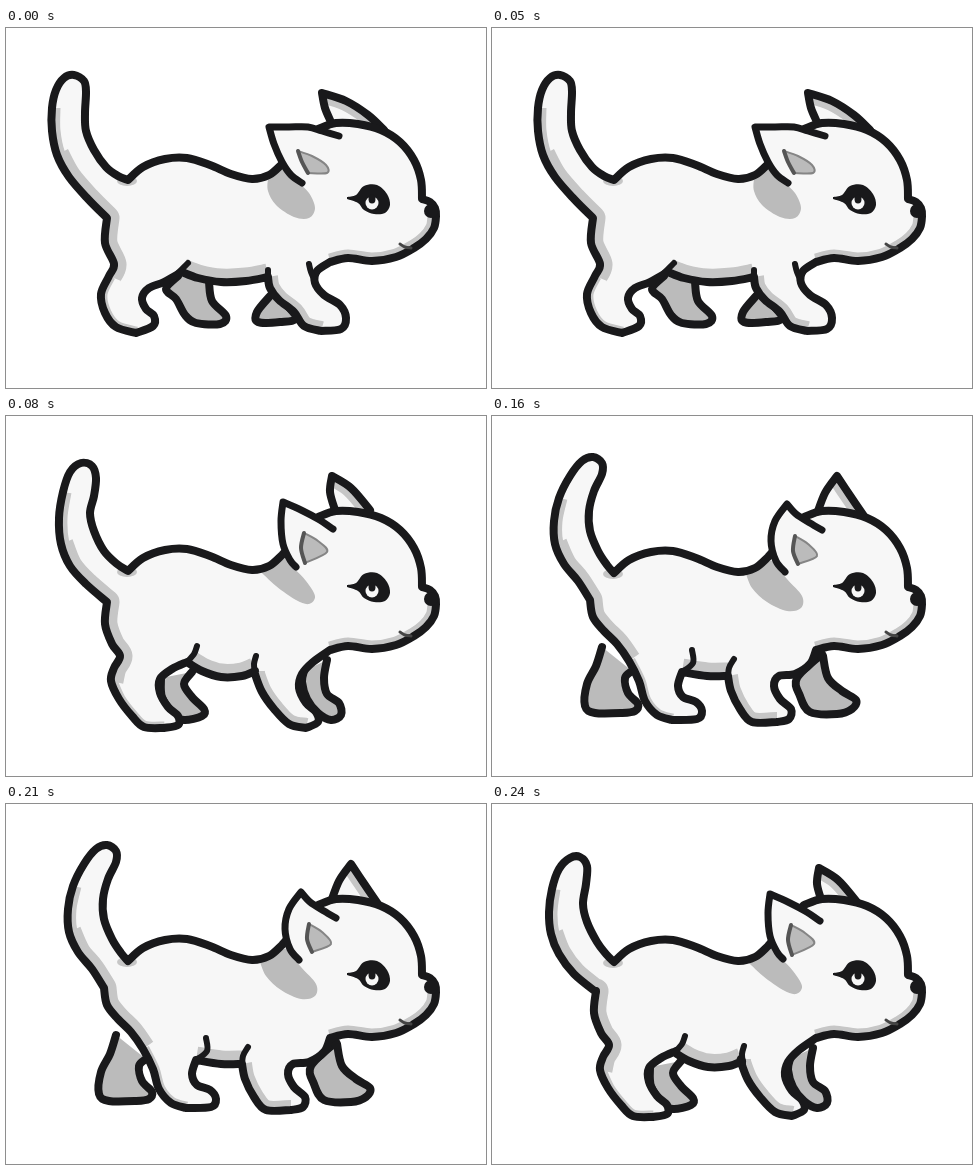
An HTML page with a canvas for the animation above (320 ms loop, 480 px wide and 360 px high).

```html
<!DOCTYPE html>
<html lang="en">
<head>
<meta charset="utf-8">
<title>Walking kitten</title>
<style>
html, body { margin: 0; width: 100%; height: 100%; overflow: hidden; background: #fff; }
canvas { display: block; width: 480px; height: 360px; }
</style>
</head>
<body>
<canvas id="stage" width="480" height="360"></canvas>
<script>
const ctx = document.getElementById('stage').getContext('2d');
const INK = '#19191b', FUR = '#f7f7f7', SHADE = '#c6c6c6', FAR = '#bbbbbb';
const STEP = 80;

// "x y x y ..." to a list of points
const pts = (text, dx = 0, dy = 0) => {
  const n = text.trim().split(/\s+/).map(Number), list = [];
  for (let i = 0; i < n.length; i += 2) list.push([n[i] + dx, n[i + 1] + dy]);
  return list;
};
const move = (list, dx, dy) => list.map(([x, y]) => [x + dx, y + dy]);

// Parts shared by all poses
const BACK = pts('122 155 137 142 159 134 181 133 204 140 225 149 246 154 263 150 276 139');
const HEAD = pts('312 101 330 95 352 96 375 102 394 114 408 132 415 152 416 171');
const CHIN = pts('416 171 424 174 429 180 430 188 428 200 420 211 408 220 390 229 366 233 342 230 324 234');
const EYE = pts('341 169 350 167 358 158 371 157 381 166 384 177 379 185 368 186 358 182 352 175 341 171');

const stride = {
  backY: 0,
  tail: pts('101 186 80 168 64 150 55 128 53 102 57 76 64 56 75 47 86 50 90 62 88 80 84 97 88 115 98 135 111 148 122 155'),
  frontR: pts('324 234 307 246 296 258 293 272 300 287 310 296 312 306 300 312'),
  frontL: pts('300 312 283 308 268 293 256 276 249 258 249 255'),
  belly: pts('249 255 236 260 215 261 196 255 181 246'),
  rearR: pts('181 246 166 253 154 263 154 277 162 291 172 300 172 309 158 312'),
  rearL: pts('158 312 138 311 126 300 113 283 105 265 108 252 114 240 106 228 99 208 101 186'),
  farRear: pts('155 262 156 281 168 298 178 304 196 300 198 293 186 281 178 268 186 256'),
  farFront: pts('298 255 296 266 301 283 312 297 325 304 335 299 333 287 321 278 318 262 321 244'),
  lines: [pts('191 230 188 238 181 246'), pts('250 240 248 248 249 257')],
  patch: pts('253 154 266 150 278 140 288 152 300 165 309 180 303 188 290 184 270 170 253 154'),
  earL: pts('290 151 284 144 277 128 275 105 277 86'),
  earR: pts('277 86 295 94 312 103 327 113'),
  earIn: pts('298 117 295 132 299 147'),
  earTip: pts('299 147 321 136 312 125 298 117'),
  farEarL: pts('329 94 324 76 326 60'),
  farEarR: pts('326 60 345 72 364 94')
};

const reach = {
  backY: -3,
  tail: pts('101 190 82 171 63 149 51 127 46 103 46 80 50 62 58 50 68 47 78 53 80 64 79 85 80 103 88 122 100 139 112 148 122 152'),
  frontR: pts('324 234 311 243 309 255 318 267 334 277 340 290 335 301 315 303'),
  frontL: pts('315 303 298 298 288 284 273 272 264 260 262 249'),
  belly: pts('262 249 240 253 215 254 192 250 176 244'),
  rearR: pts('176 244 158 254 143 260 136 270 140 281 148 288 147 298 130 305'),
  rearL: pts('130 305 110 299 99 285 95 266 103 248 108 236 99 215 101 190'),
  farRear: pts('172 248 160 261 170 271 179 287 190 295 214 296 220 288 206 273 203 254'),
  farFront: pts('264 268 251 284 252 294 274 294 290 290 276 272'),
  lines: [pts('182 235 176 241 168 249'), pts('262 242 262 252'), pts('303 236 305 244 309 253')],
  patch: pts('262 150 277 138 290 152 303 165 309 180 303 190 288 189 270 177 262 163 262 150'),
  earL: pts('296 155 285 147 276 134 268 116 263 99'),
  earR: pts('263 99 283 99 302 99 316 103 333 108'),
  earIn: pts('292 123 296 134 302 145'),
  earTip: pts('302 145 321 145 320 137 306 128 292 123'),
  farEarL: pts('325 94 319 80 316 65'),
  farEarR: pts('316 65 340 73 362 87 378 102')
};

const cross = {
  backY: 2,
  tail: pts('98 184 86 165 72 148 63 128 62 105 67 82 78 60 90 45 101 41 110 47 110 58 102 75 97 95 98 115 106 135 115 149 122 157'),
  frontR: pts('324 234 318 248 303 258 287 260 282 270 288 283 299 293 297 303 285 306'),
  frontL: pts('285 306 260 306 248 293 239 275 236 260'),
  belly: pts('236 260 215 260 190 256'),
  rearR: pts('190 256 186 270 191 281 204 286 210 295 205 303 180 304'),
  rearL: pts('180 304 165 299 153 285 147 265 137 245 125 228 112 215 101 201 98 184'),
  farRear: pts('110 231 104 250 95 268 93 290 103 297 130 297 143 295 146 288 136 277 133 262 140 255'),
  farFront: pts('330 238 305 262 308 280 318 296 345 298 360 293 364 284 350 275 336 262 331 240'),
  lines: [pts('200 234 201 247 190 256'), pts('242 243 237 252 236 264')],
  patch: pts('253 155 266 150 280 145 295 163 310 180 309 192 295 195 275 186 260 172 253 155'),
  earL: pts('293 156 284 145 279 125 283 105 295 88'),
  earR: pts('295 88 304 98 318 107 330 114'),
  earIn: pts('303 120 301 135 306 148'),
  earTip: pts('306 148 325 140 316 128 303 120'),
  farEarL: pts('325 98 333 77 345 60'),
  farEarR: pts('345 60 357 78 372 100')
};

// The return stride sits slightly lower and further right at the rear
const back = { ...stride, backY: 3,
  tail: pts('104 188 82 170 67 150 59 130 57 108 60 85 67 65 78 54 88 53 95 62 94 80 91 100 95 118 105 138 114 150 122 158')
};
for (const key of ['rearR', 'rearL', 'farRear']) back[key] = move(stride[key], 3, 1);
for (const key of ['belly', 'patch']) back[key] = move(stride[key], 1, 2);
for (const key of ['earL', 'earR', 'earIn', 'earTip', 'farEarL', 'farEarR']) back[key] = move(stride[key], 1, 4);
back.lines = stride.lines.map(line => move(line, 2, 2));

const POSES = [reach, stride, cross, back];

// Smooth runs joined at corners
function trace(...runs) {
  const path = new Path2D();
  runs.forEach((run, k) => {
    path[k ? 'lineTo' : 'moveTo'](...run[0]);
    for (let i = 0; i + 1 < run.length; i++) {
      const a = run[Math.max(i - 1, 0)], b = run[i], c = run[i + 1];
      const d = run[Math.min(i + 2, run.length - 1)];
      path.bezierCurveTo(
        b[0] + (c[0] - a[0]) / 6, b[1] + (c[1] - a[1]) / 6,
        c[0] - (d[0] - b[0]) / 6, c[1] - (d[1] - b[1]) / 6, c[0], c[1]);
    }
  });
  return path;
}

function fill(path, color) {
  ctx.fillStyle = color;
  ctx.fill(path);
}

function stroke(path, width, color = INK) {
  ctx.strokeStyle = color;
  ctx.lineWidth = width;
  ctx.stroke(path);
}

function dot(x, y, rx, ry, color) {
  ctx.beginPath();
  ctx.ellipse(x, y, rx, ry, 0, 0, Math.PI * 2);
  ctx.fillStyle = color;
  ctx.fill();
}

function shape(path, color, width = 8) {
  fill(path, color);
  stroke(path, width);
}

function drawBody(p) {
  const body = trace(move(BACK, 0, p.backY), HEAD, CHIN, p.frontR, p.frontL,
    p.belly, p.rearR, p.rearL, p.tail);
  body.closePath();
  fill(body, FUR);
  ctx.save();
  ctx.clip(body);
  ctx.lineCap = 'butt';
  stroke(trace(p.belly), 27, SHADE);
  stroke(trace(p.frontL), 20, SHADE);
  stroke(trace(p.rearL.slice(0, 5)), 13, SHADE);
  stroke(trace(p.rearL.slice(4), p.tail.slice(0, 4)), 25, SHADE);
  stroke(trace(p.tail.slice(2, 6)), 17, SHADE);
  stroke(trace(CHIN.slice(3)), 17, SHADE);
  dot(121, 156 + p.backY, 10, 5, SHADE);
  fill(trace(p.patch), FAR);
  ctx.restore();
  stroke(body, 8);
  p.lines.forEach(line => stroke(trace(line), 6));
}

function drawFace(p) {
  shape(trace(p.earL, p.earR), FUR, 7);
  fill(trace(p.earIn, p.earTip), FAR);
  stroke(trace(p.earTip), 2, '#858585');
  stroke(trace(p.earIn), 4, '#555');
  fill(trace(EYE), INK);
  dot(366, 175, 6.5, 6.5, FUR);
  dot(366, 171, 3.5, 4.5, INK);
  dot(425, 183, 7, 7, INK);
  stroke(trace(pts('394 216 399 219 405 220')), 3, '#444');
}

function draw(p) {
  ctx.fillStyle = '#fff';
  ctx.fillRect(0, 0, 480, 360);
  ctx.lineCap = ctx.lineJoin = 'round';
  shape(trace(p.farRear), FAR);
  shape(trace(p.farFront), FAR);
  const ear = trace(p.farEarL, p.farEarR);
  fill(ear, FUR);
  ctx.save();
  ctx.clip(ear);
  stroke(trace(p.farEarR), 20, SHADE);
  ctx.restore();
  stroke(ear, 8);
  drawBody(p);
  drawFace(p);
}

function tick() {
  draw(POSES[Math.floor(performance.now() / STEP) % POSES.length]);
  requestAnimationFrame(tick);
}
tick();
</script>
</body>
</html>
```
